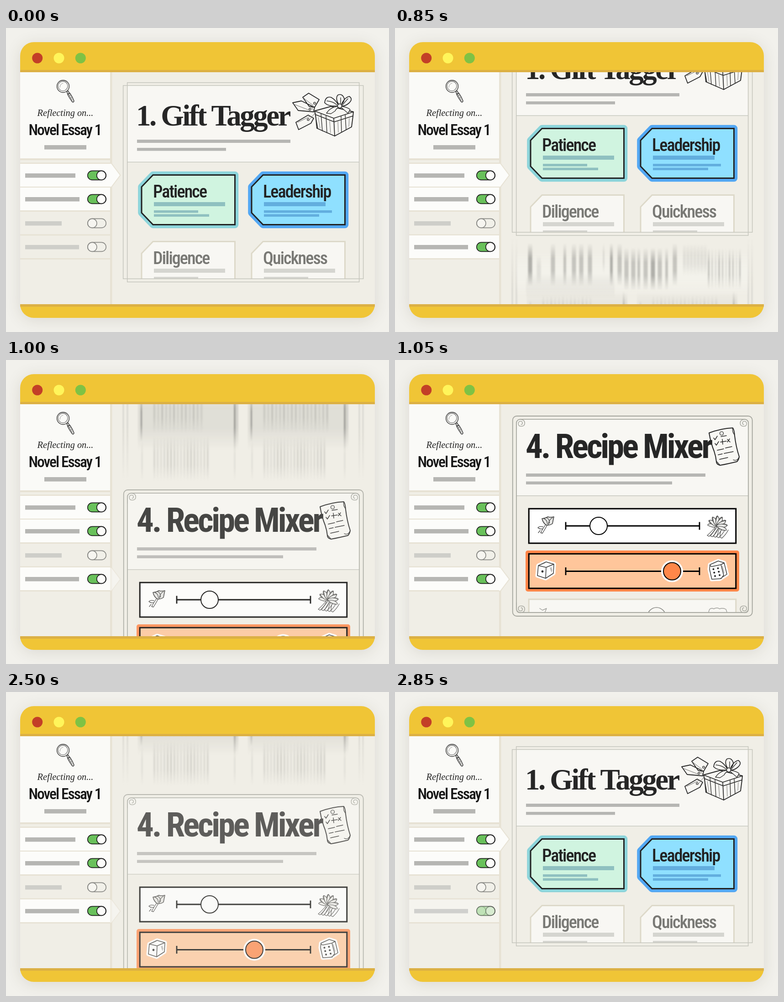
Animation, 839 px wide and 667 px high, one loop 2950 ms. Source, as an HTML page with a canvas:

```html
<!DOCTYPE html>
<html lang="en">
<head>
<meta charset="utf-8">
<title>Reflection workspace</title>
<style>
  html, body { margin: 0; width: 100%; height: 100%; overflow: hidden; background: #f2f1ec; }
  canvas { display: block; }
</style>
</head>
<body>
<canvas id="stage" width="839" height="667"></canvas>
<script>
const W = 839, H = 667, LOOP = 2950, GAP = 785;
const stage = document.getElementById('stage').getContext('2d');
const layer = document.createElement('canvas');
layer.width = W;
layer.height = H;
const page = layer.getContext('2d');
let c = stage;

const SANS = '"Roboto Condensed", "Open Sans Condensed", Roboto, sans-serif';
const SERIF = '"Liberation Serif", serif';
const PAPER = '#f0eee6', CREAM = '#f8f7f3', WHITE = '#fcfcfa', EDGE = '#e7e2d4';
const INK = '#262626', BAR = '#b6b6b3', PALE = '#ddd9c9';

// time, scroll, tagger opacity, mixer opacity, upper pointer, lower pointer, fourth switch
const KEYS = [
  [0, 0, 1, 0, 1, 0, 0],
  [750, 0, 1, 0, 1, 0, .5],
  [800, 28, 1, 0, 1, 0, 1],
  [850, 102, 1, 0, 1, 0, 1],
  [900, 260, .7, 0, .5, 0, 1],
  [950, 445, .4, .5, 0, 0, 1],
  [1000, 623, 0, .84, 0, .5, 1],
  [1050, GAP, 0, 1, 0, 1, 1],
  [2500, 683, 0, .72, 0, .5, 1],
  [2550, 530, 0, .45, 0, 0, 1],
  [2600, 365, .45, 0, 0, 0, 1],
  [2650, 211, .72, 0, 0, 0, 1],
  [2700, 85, .9, 0, .5, 0, 1],
  [2750, 0, 1, 0, 1, 0, 1],
  [2850, 0, 1, 0, 1, 0, .4]
];
const KNOB = [[0, 607], [1550, 595], [1650, 556], [1750, 544]];
const at = (keys, t) => keys.filter(k => k[0] <= t).pop();

function box(x, y, x2, y2, fill) {
  c.fillStyle = fill;
  c.fillRect(x, y, x2 - x, y2 - y);
}

function frame(x, y, x2, y2, color, width, radius = 0) {
  c.beginPath();
  c.roundRect(x, y, x2 - x, y2 - y, radius);
  c.strokeStyle = color;
  c.lineWidth = width;
  c.stroke();
}

function disc(x, y, r, fill, color, width) {
  c.beginPath();
  c.arc(x, y, r, 0, 7);
  paint(null, fill, color, width);
}

function paint(path, fill, color, width = 1.5) {
  const p = path ? [path] : [];
  if (fill) { c.fillStyle = fill; c.fill(...p); }
  if (color) { c.strokeStyle = color; c.lineWidth = width; c.stroke(...p); }
}

function sketch(d, fill, color = '#3a3a39', width = 1.5) {
  c.lineJoin = c.lineCap = 'round';
  paint(new Path2D(d), fill, color, width);
  c.lineCap = 'butt';
  c.lineJoin = 'miter';
}

// track is the letter spacing in em
function text(str, x, y, style, size, family, color, track = -.05, align = 'left') {
  c.font = `${style} ${size}px ${family}`;
  c.fontStretch = 'extra-condensed';
  c.letterSpacing = track * size + 'px';
  c.textAlign = align;
  c.fillStyle = color;
  c.fillText(str, x, y);
  c.letterSpacing = '0px';
}

function chrome() {
  c.fillStyle = '#f2f1ec';
  c.fillRect(0, 0, W, H);
  c.save();
  c.shadowColor = 'rgba(70,65,40,.13)';
  c.shadowBlur = 34;
  c.shadowOffsetY = 5;
  c.fillStyle = '#f0c536';
  c.beginPath();
  c.roundRect(31, 31, 777, 605, 30);
  c.fill();
  c.restore();
  box(31, 92, 808, 97, '#dcb044');
  box(31, 606, 808, 611.5, '#dcb044');
  ['#c33f27', '#fff55a', '#7fc244'].forEach((f, i) => disc(68.7 + 47.3 * i, 66, 11.5, f));
  box(31, 97, 808, 606, PAPER);
}

function lens() {
  sketch('M133 139l3-1 3 5-4 2zM135 146l5-3q6 9 9 17-1 4-4 2-6-8-10-16z', '#e9e9e6', '#444', 1.6);
  sketch('M138 149l4-2M141 154l3-2M137 145l8 14', null, '#666', 1);
  disc(125, 128, 13.4, '#fbfbf8', '#4b4b4a', 1.6);
  disc(124.6, 127.5, 10.4, null, '#777', 1.2);
  sketch('M118 130q0-7 7-9M117 120q9-8 17 1', null, '#999', 1);
}

function toggle(y, on) {
  c.beginPath();
  c.roundRect(178.8, y - 10, 40.4, 20, 10);
  paint(null, on ? '#69c15b' : '#f1f0e9', on ? '#1d1d1d' : '#8a8a86', 1.6);
  disc(on ? 208.8 : 189, y, 10, on ? WHITE : '#f6f5f0', on ? '#1d1d1d' : '#8a8a86', 1.6);
}

function row(i, end, on) {
  const y = 298 + Math.round(52.4 * i);
  if (on) box(31, y, 228, y + 50, WHITE);
  box(42, y + 21, end, y + 30.5, on ? BAR : '#cecec9');
  toggle(y + 25.4, on);
}

function pointer(y, alpha) {
  c.globalAlpha = alpha;
  sketch(`M228 ${y - 25}h3l18.5 25-18.5 25h-3z`, WHITE, null);
  sketch(`M231 ${y - 26}l19.5 26-19.5 26`, null, EDGE, 2);
  c.globalAlpha = 1;
}

function sidebar(k) {
  box(31, 97, 228, 286, '#fafaf7');
  box(228, 97, 232.5, 606, EDGE);
  box(31, 286, 228, 290, EDGE);
  for (let i = 0; i < 5; i++) box(31, 295.4 + 52.4 * i, 228, 298.2 + 52.4 * i, EDGE);
  lens();
  text('Reflecting on...', 130, 193, 'italic', 20.3, SERIF, '#222', 0, 'center');
  text('Novel Essay 1', 129, 235, '500', 33.5, SANS, '#161616', -.06, 'center');
  box(84, 257, 176, 266.5, BAR);
  row(0, 152, true);
  row(1, 161, true);
  row(2, 122, false);
  row(3, 160, false);
  c.globalAlpha = k[6];
  if (k[6]) row(3, 160, true);
  c.globalAlpha = 1;
  pointer(323, k[4]);
  pointer(481, k[5]);
}

function gift() {
  sketch('M650 152l13-9 23 14-10 17-12-2zM628 164l19-4 29 14-2 10-34-3zM635 207l27-16 12 7-6 11-27 14z', CREAM, INK, 1.8);
  sketch('M651 153l22 17M630 167l36 14M639 207l27-13M676 184q-7-7-5-12M676 188q-6 6-10 12', null, '#666', 1);
  [[676, 165], [666, 178], [662, 201]].forEach(p => disc(p[0], p[1], 2.2, CREAM, INK, 1.2));
  sketch('M676 182l36-10 49 12-1 10-3 23-37 20-39-17-3-30z', CREAM, INK, 1.9);
  sketch('M676 182l42 16 43-14M678 190l41 16 41-13M718 198l2 39', null, INK, 1.7);
  sketch('M690 188l3 38M701 192l2 38M734 193l1 36M743 190l2 33M676 182l7 38');
  sketch('M684 196l4 24M709 204l2 26M727 205l1 24M752 198l-1 18', null, '#777', 1);
  sketch('M729 171q-23 2-31-7 2-15 14-12 11 6 17 19zM731 171q-11-16-4-24 10-4 14 8 0 9-10 16zM733 172q7-19 19-22 9 6-1 15-8 7-18 7z', CREAM, INK, 1.7);
  sketch('M728 172q-17 1-26 15l10 1 9-6q3-6 9-9M733 173l16 14 5-8q-7-6-20-7', CREAM);
  sketch('M703 160q14 1 22 9M733 153q1 10-2 17M749 155q-7 8-13 15');
  disc(731, 171, 4.5, CREAM, INK, 1.5);
}

const tag = (x, y) => `M${x + 25} ${y}h179.5v109h-179.5l-25-26v-57z`;

function card(x, y, name, ends, look) {
  const shape = tag(x, y);
  if (look.halo) sketch(shape, null, look.halo, 15.5);
  paint(new Path2D(shape), look.fill, look.line, 3);
  text(name, x + 25, y + 49, '500', 38, SANS, look.ink);
  ends.forEach((e, i) => {
    const top = y + [59.5, 77.5, 86][i];
    box(x + 27, top, e, top + (i ? 5.5 : 9), look.bar);
  });
}

function clip(x, y, x2, y2) {
  c.save();
  c.beginPath();
  c.rect(x, y, x2 - x, y2 - y);
  c.clip();
}

function tagger() {
  box(266, 126, 774, 294, CREAM);
  box(266, 293.5, 774, 295, '#c8c9c0');
  gift();
  text('1. Gift Tagger', 285, 214, '700', 65, SERIF, INK, -.055);
  box(287, 245, 623, 252, BAR);
  box(287, 263, 482, 269.5, BAR);
  const vivid = { line: '#222', ink: '#222' };
  card(297, 322.5, 'Patience', [480, 421, 445], { ...vivid, halo: '#8cd4da', fill: '#d0f4e0', bar: '#8fc0c0' });
  card(538, 322.5, 'Leadership', [700, 714, 686], { ...vivid, halo: '#52a7f3', fill: '#8fe0ff', bar: '#62aede' });
  const dim = { fill: CREAM, line: PALE, ink: '#797975', bar: '#d5d5d0' };
  clip(266, 450, 774, 550);
  card(297, 468.5, 'Diligence', [480, 421], dim);
  card(538, 468.5, 'Quickness', [721, 662], dim);
  c.restore();
  frame(256.7, 126.2, 782.7, 550.2, '#c5c6bd', 1.5);
  frame(265.7, 119.7, 773.7, 557.2, '#c5c6bd', 1.5);
}

function recipe() {
  sketch('M688 160q27-10 52-11 3 4 4 17 3 25 10 46-1 7-5 11-20 5-37 8-8-2-8-8-1-11-5-23-7-17-11-40z', CREAM, INK, 2);
  sketch('M704 222q4 4 8 9M741 219q8 4 13-6M740 150q-2 7 3 13', null, INK, 1.3);
  disc(715.5, 161, 4, '#e8e8e4', INK, 1.2);
  sketch('M698 171l3 4 5-8M701 183l3 4 5-8M713 180l13-2M717 174l1 11M728 174l6 6M733 173l-5 7M714 168l12-2M706 198l14-3M724 193l14-3M708 208l9-2M721 205l20-4M711 218l18-4', null, INK, 1.5);
}

function flower() {
  sketch('M322 348q8-1 13-4 4 2 13 0-2 9-3 15-7 5-14 3-7-5-9-14z', '#e5e5e3');
  sketch('M326 348q7 2 8 12M345 346q-8 4-9 15M332 346q7 3 6 12M330 361q-6 9-11 18l4 1q5-8 10-17M324 366q-8-2-11 2 4 4 11 2M318 374l-4 5', null, '#444', 1.3);
}

function bouquet() {
  c.save();
  c.translate(706, 364);
  for (let i = 0; i < 5; i++) sketch(`M${-4 + i * 4} 2q-6 8-${18 - i * 3} ${19 + i}l4 2q9-8 14-18`, null, '#4b4b4a', 1.2);
  for (let i = 0; i < 7; i++) {
    c.save();
    c.rotate(-1.3 + i * .5);
    sketch('M0 2q-8-8-4-23 4 1 5 7 2-7 6-7 3 12-7 23zM1-2q-2-8 0-12', '#ececea', '#474746', 1.2);
    c.restore();
  }
  c.restore();
}

function dice() {
  const a = 'M314 451l17-8 17 5-1 20-17 11-18-6z';
  const b = 'M690 449l18-8 13 4 6 25-15 10-18 1-5-22z';
  [a, b].forEach(d => sketch(d, '#fff', '#fff', 9));
  sketch(a + 'M314 451l17 4 17-7M331 455l-1 24');
  sketch(b + 'M690 449q0 4 5 4l19-4 7-4M714 449l6 23-6 8');
  sketch('M340 456l3 9M342 455l2 7M320 449l9-4M717 452l4 15', null, '#777', 1);
  disc(323, 464, 2.4, INK);
  for (let i = 0; i < 6; i++) disc(697.5 + (i % 2) * 10 + (i >> 1) * 1.8, 459 - (i % 2) * 2 + (i >> 1) * 7.5, 2, INK);
}

function slider(y, x, fill, halo) {
  box(374, y - 1.5, 667, y + 1.5, '#000');
  [374, 667].forEach(e => box(e - 1.4, y - 8.5, e + 1.4, y + 8.5, '#000'));
  if (halo) disc(x, y, 24, '#fff');
  disc(x, y, 19, fill, '#000', 2);
}

function corners() {
  for (const sx of [1, -1]) for (const sy of [1, -1]) {
    c.save();
    c.translate(520.2, 342.5);
    c.scale(sx, sy);
    sketch('M-254-190v-14q0-8 8-8 10 0 10 8 0 7-8 7-6 0-6-6 0-5 5-5 4 0 4 4 0 3-3 3', null, '#a9aaa2', 1.6);
    c.restore();
  }
}

function mixer(knob) {
  box(266, 131, 774, 297, CREAM);
  box(266, 297, 774, 298.6, '#c8c9c0');
  frame(257.7, 123, 782.7, 562, '#a4a59d', 1.8, 9);
  frame(266, 130.2, 774, 554, '#a9aaa2', 1.8, 8);
  corners();
  recipe();
  text('4. Recipe Mixer', 286, 215, '700', 75, SANS, INK, -.055);
  box(287, 249, 680, 256, BAR);
  box(287, 266.5, 607, 273, BAR);

  box(293, 326, 747, 402, '#fff');
  frame(293.2, 326.3, 746.8, 402, '#000', 3);
  slider(364, 446, '#fff');
  flower();
  bouquet();

  c.fillStyle = '#ff8749';
  c.beginPath();
  c.roundRect(286, 418, 468, 90, 5);
  c.fill();
  box(293, 425, 747, 501, '#ffc69b');
  frame(293.2, 425.3, 746.8, 501, '#000', 3);
  slider(463.5, knob, '#ff8749', true);
  dice();

  clip(268, 515, 772, 553);
  box(293, 525, 747, 600, CREAM);
  frame(293.2, 525, 746.8, 600, PALE, 3);
  disc(573, 563, 20, CREAM, '#8d8d89', 1.7);
  sketch('M317 545l6 4 9-4-5 12M686 556l3-9q5-4 9-1 8-4 13 0 7-3 14 1l3 9', null, '#a0a09c', 1.4);
  c.restore();
}

// one vertical streak that fades at both ends
function streak(x, w, y, y2, alpha, shade = 110) {
  const g = c.createLinearGradient(0, y, 0, y2);
  const tone = a => `rgba(${shade},${shade},${shade - 4},${a})`;
  g.addColorStop(0, tone(0));
  g.addColorStop(.35, tone(alpha));
  g.addColorStop(.65, tone(alpha));
  g.addColorStop(1, tone(0));
  box(x - w / 2, y, x + w / 2, y2, g);
}

function blur() {
  c.filter = 'blur(1.6px)';
  [257, 266, 774, 782].forEach(x => streak(x, 2, 558, 888, .25));
  streak(520, 508, 590, 692, .3, 250);
  streak(384, 194, 640, 696, .06);
  [296, 346, 372, 392, 408, 427, 474, 492, 507, 522, 534, 549, 565, 580, 595, 613].forEach((x, i) => {
    const deep = i > 7 && i < 15 ? 10 : 0;
    streak(x, i % 4 === 2 ? 6 : 9, 574 + deep, 668 + deep, i % 6 ? .34 : .5);
  });
  streak(315, 9, 600, 665, .13);
  streak(457, 3, 574, 640, .18);
  for (let i = 0; i < 17; i++) {
    const low = i > 6;
    streak(634 + i * 7.6, low ? 3 : 6, low ? 585 : 575, low ? 675 : 645, low ? .28 + .14 * Math.sin(i * 2) : .12);
  }
  for (const x of [0, 241]) {
    const wide = x ? 143 : 112;
    streak(x + 399, 220, 680, 822, .12);
    streak(x + 296.5, 3, 700, 802, .6);
    streak(x + 501, 3.5, 680, 820, .6);
    streak(x + 506, 5, 684, 812, .12);
    for (let d = 3; d < wide; d += 8.6) streak(x + 322 + d, 4, 688, 782, .18 + .06 * Math.sin(d));
    for (let d = 3; d < wide - (x ? 8 : -9); d += 7.3) streak(x + 322 + d, 3, 790, 888, .2 + .06 * Math.sin(d));
    [298, 501].forEach(e => streak(x + e, 2.5, 800, 888, .14));
  }
  c.filter = 'none';
}

function place(draw, y, alpha) {
  if (!alpha) return;
  c = page;
  c.clearRect(0, 0, W, H);
  draw();
  c = stage;
  c.globalAlpha = alpha;
  c.drawImage(layer, 0, y);
  c.globalAlpha = 1;
}

function render(t) {
  const k = at(KEYS, t), scroll = k[1];
  c = stage;
  chrome();
  clip(233, 97, 808, 606);
  if (scroll > 0 && scroll < GAP) {
    c.save();
    c.translate(0, -scroll);
    blur();
    c.restore();
  }
  place(tagger, -scroll, k[2]);
  place(() => mixer(at(KNOB, t)[1]), GAP - scroll, k[3]);
  c.restore();
  sidebar(k);
}

const start = performance.now();
function tick(now) {
  render(Math.max(0, now - start) % LOOP);
  requestAnimationFrame(tick);
}
render(0);
requestAnimationFrame(tick);
</script>
</body>
</html>
```
